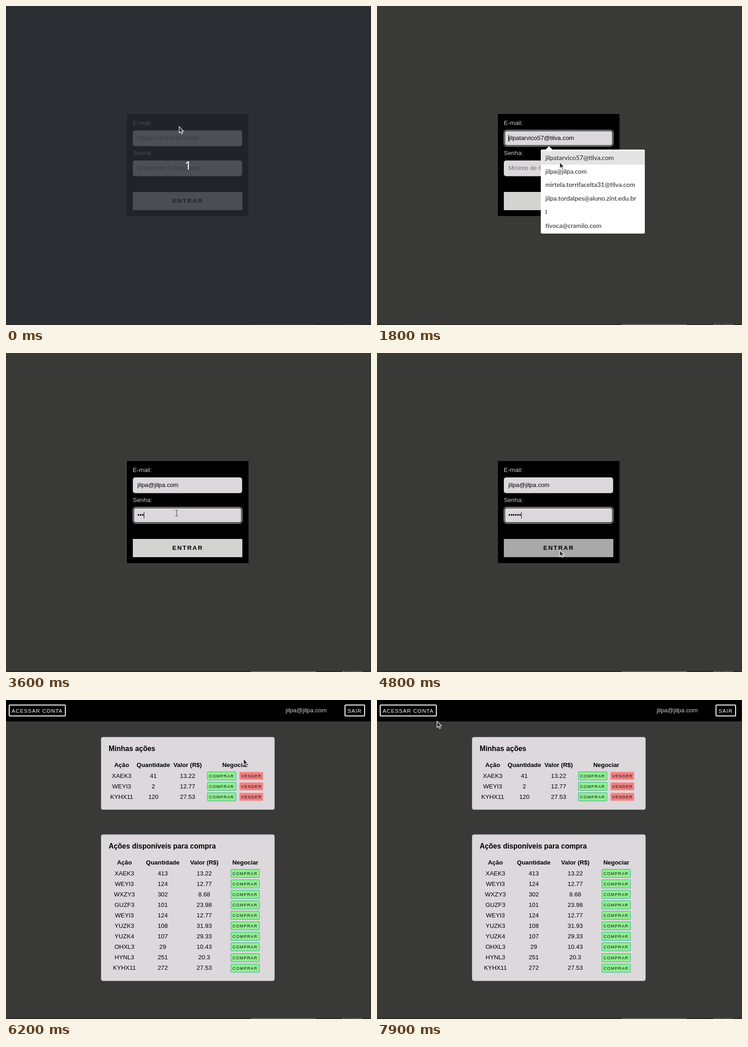
These frames come from a looping animation (800 px wide and 700 px high, 8000 ms). An HTML page:

```html
<!DOCTYPE html>
<html lang="pt-BR">
<head>
<meta charset="utf-8">
<style>
  html, body { margin: 0; width: 100%; height: 100%; overflow: hidden; background: #393937; }
  svg { display: block; }
  text { font: 13.33px "Liberation Sans", Arial, sans-serif; white-space: pre; }
  .bold { font-weight: bold; }
  .title { font-size: 15.6px; font-weight: bold; }
  .mid { text-anchor: middle; }
  .enter { font-weight: bold; letter-spacing: 2px; }
  .nav { font-size: 11.5px; letter-spacing: 1.1px; }
  .trade { font-size: 9px; letter-spacing: 1.25px; }
  .option { font: 14px Lato, sans-serif; }
  .count { font: 500 26px "Noto Sans", sans-serif; }
  .strip { font-size: 8.5px; letter-spacing: .4px; }
</style>
</head>
<body>
<svg id="stage" width="800" height="700" viewBox="0 0 800 700"></svg>
<script>
const LOOP = 8000, STEP = 100;
const EMAIL = 'jilpa@jilpa.com';
const OPTIONS = ['jilpatarvico57@tilva.com', EMAIL, 'mirtela.torrifacelta31@tilva.com',
  'jilpa.tordalpes@aluno.zint.edu.br', 'l', 'tivoca@cramilo.com'];
const OWNED = [['XAEK3', 41, 13.22], ['WEYI3', 2, 12.77], ['KYHX11', 120, 27.53]];
const OFFERS = [['XAEK3', 413, 13.22], ['WEYI3', 124, 12.77], ['WXZY3', 302, 8.68],
  ['GUZF3', 101, 23.98], ['WEYI3', 124, 12.77], ['YUZK3', 108, 31.93], ['YUZK4', 107, 29.33],
  ['OHXL3', 29, 10.43], ['HYNL3', 251, 20.3], ['KYHX11', 272, 27.53]];
const HEADERS = ['Ação', 'Quantidade', 'Valor (R$)', 'Negociar'];
const KEYSTROKES = [3200, 3500, 3600, 3900, 4200, 4400];

// Pointer path: time, x, y
const PATH = [[0, 379, 264], [100, 379, 266], [400, 382, 298], [1000, 382, 298], [1300, 386, 300],
  [1400, 386, 300], [1800, 400, 342], [2000, 398, 358], [2200, 371, 319], [2400, 373, 347],
  [2600, 374, 349], [3000, 374, 349], [3100, 374, 351], [4400, 374, 351], [4800, 400, 432],
  [5100, 400, 432], [5800, 482, 150], [5900, 482, 150], [6200, 520, 128], [6300, 536, 123],
  [6700, 603, 268], [6900, 603, 268], [7400, 253, 74], [7500, 253, 74], [7900, 131, 46], [8000, 131, 46]];

const rect = (x, y, w, h, fill, extra = '') =>
  `<rect x="${x}" y="${y}" width="${w}" height="${h}" fill="${fill}" ${extra}/>`;
const text = (x, y, str, fill = '#000', cls = '') =>
  `<text x="${x}" y="${y}" fill="${fill}" class="${cls}">${str}</text>`;
const path = (d, extra) => `<path d="${d}" ${extra}/>`;
const within = (v, a, b) => v >= a && v < b;

function pointerAt(t) {
  const i = PATH.findIndex(p => p[0] > t);
  const [t0, x0, y0] = PATH[i - 1], [t1, x1, y1] = PATH[i];
  const k = (t - t0) / (t1 - t0);
  return [Math.round(x0 + (x1 - x0) * k), Math.round(y0 + (y1 - y0) * k)];
}

function pointer([x, y], beam) {
  if (beam) {
    const d = `M${x - 3} ${y - 6}h2l1 1l1-1h2M${x} ${y - 5}v11M${x - 3} ${y + 7}h2l1-1l1 1h2`;
    return path(d, 'fill="none" stroke="#fff" stroke-width="2.4" opacity=".6"') +
      path(d, 'fill="none" stroke="#222"');
  }
  return path(`M${x + .5} ${y + .5}v14l3.2-2.9l2.3 5l2.3-1l-2.3-4.8h4.4z`,
    'fill="#2d2d2d" stroke="#fff" stroke-width="1.1"');
}

const caret = (x, y) => rect(x, y, 1, 14, '#000');

function squiggle(x0, x1) {
  let d = `M${x0} 296.5`;
  for (let x = x0; x < x1; x += 4) d += 'l2-1.5l2 1.5';
  return path(d, 'fill="none" stroke="#e8503c" stroke-width=".9"');
}

function field(y, focused) {
  if (!focused) return rect(278, y, 239.5, 34.5, '#dcd8dc', 'rx="5"');
  return rect(278.5, y - .5, 239, 35, '#000', 'rx="5" stroke="#fff"') +
    rect(280.5, y + 1.5, 235, 31, '#dcd8dc', 'rx="4"');
}

function optionList(hovered) {
  return rect(359, 315.5, 228, 185.5, '#000', 'rx="4" opacity=".3"') +
    rect(359, 315, 228, 184.5, '#fff', 'rx="3"') + path('M369 315.5l8-7.5l8 7.5z', 'fill="#fff"') +
    (hovered >= 0 ? rect(359, 318.5 + hovered * 29.7, 228, 29.7, '#e4e4e4') : '') +
    OPTIONS.map((o, i) => text(369, Math.round(338 + i * 29.7), o, '#222', 'option')).join('');
}

function login(t, [x, y]) {
  const first = within(t, 400, 2500), second = t >= 2500, open = within(t, 500, 2000);
  const hovered = open && y >= 319 ? Math.floor((y - 318.5) / 29.7) : -1;
  const value = t >= 2000 ? EMAIL : hovered >= 0 ? OPTIONS[hovered] : '';
  const typed = KEYSTROKES.filter(k => k <= t).length;
  let s = rect(265, 237, 266.5, 224, '#000') +
    text(278, 261, 'E-mail:', '#ccc') + text(278, 327, 'Senha:', '#ccc') +
    field(273, first) + field(339, second) +
    text(288, 294, value || 'Digite um e-mail válido', value ? '#000' : '#757575') +
    (typed ? text(288, 360, '•'.repeat(typed)) : text(288, 360, 'Mínimo de 6 caracteres', '#757575')) +
    rect(278, 408, 240, 40, y >= 408 ? '#a9a9a9' : '#d3d3d1') + text(364.5, 432, 'ENTRAR', '#000', 'enter');
  if (first && t >= 2000) s += squiggle(288, 316) + squiggle(325, 376) + caret(376.5, 283);
  else if (first && !within(t, 1100, 1600)) s += caret(288, 283);
  if (second && !within(t, 3100, 3200)) s += caret(Math.round(287.6 + typed * 4.67), 349);
  return s + (open ? optionList(hovered) : '');
}

function tradeButton(x, y, sell) {
  const [w, h, fill, line, label] = sell
    ? [52, 17, '#f08080', '#f4a3a3', 'VENDER'] : [63, 18, '#90ee90', '#35b08c', 'COMPRAR'];
  return rect(x + .5, y - h / 2, w - .5, h, fill, `stroke="${line}" rx="1"`) +
    text(x + 4, y + 3.5, label, '#111', 'trade');
}

function card(top, height, title, columns, rows, [px, py], owned) {
  const first = top + 85, pitch = 23.1;
  let s = rect(208.5, top + .5, 380, height, '#dcd8dc', 'rx="4" stroke="#a8a6a8"') +
    text(225, top + 31, title, '#000', 'title') +
    HEADERS.map((h, i) => text(columns[i], top + 66, h, '#000', 'bold mid')).join('');
  rows.forEach((row, r) => {
    const y = first + r * pitch;
    if (within(px, 225, 572) && within(py, y - 11.2, y + 11.9))
      s += rect(225, Math.round(y - 11), 347, 23, '#a3a2a0');
    s += row.map((v, i) => text(columns[i], Math.round(y + 4.8), v, '#000', 'mid')).join('');
    const mid = Math.round(y) + .5;
    s += owned ? tradeButton(441, mid, false) + tradeButton(511.5, mid, true) : tradeButton(492.5, mid, false);
  });
  return s;
}

function navButton(x, w, label) {
  return rect(x + 1, 11, w - 2, 24, '#000', 'stroke="#fff" stroke-width="2" rx="1.5"') +
    text(x + 6.5, 27.5, label, '#fff', 'nav');
}

function portfolio(pos) {
  return rect(0, 0, 799, 47, '#000') + navButton(6, 125, 'ACESSAR CONTA') + navButton(742, 45, 'SAIR') +
    text(613, 27, EMAIL, '#ccc') +
    card(81, 159, 'Minhas ações', [253.5, 323, 398, 502.5], OWNED, pos, true) +
    card(294.7, 321, 'Ações disponíveis para compra', [259.5, 343.5, 434.5, 524.5], OFFERS, pos, false);
}

function scene(t) {
  const pos = pointerAt(t), [, y] = pos, loggedIn = t >= 5000;
  const overList = within(t, 500, 2000) && y > 308;
  const beam = !loggedIn && !overList && (within(y, 273, 308) || within(y, 339, 374));
  let s = rect(0, 0, 800, 700, '#393937') + (loggedIn ? portfolio(pos) : login(t, pos)) +
    rect(799, 0, 1, 700, '#2b2b2a') + rect(0, 698.5, 800, 1.5, '#22221d') +
    rect(537, 698.5, 142, 1.5, '#777') + text(737, 704, 'REMOTES', '#aaa', 'strip');
  if (t < 100) s += rect(0, 0, 800, 700, 'rgb(40,45,52)', 'opacity=".8"') + text(399, 359, '1', '#fff', 'count mid');
  return s + pointer(pos, beam);
}

const stage = document.getElementById('stage');
let shown = -1;
function tick() {
  const t = Math.floor(performance.now() % LOOP / STEP) * STEP;
  if (t !== shown) stage.innerHTML = scene(shown = t);
  requestAnimationFrame(tick);
}
tick();
</script>
</body>
</html>
```
